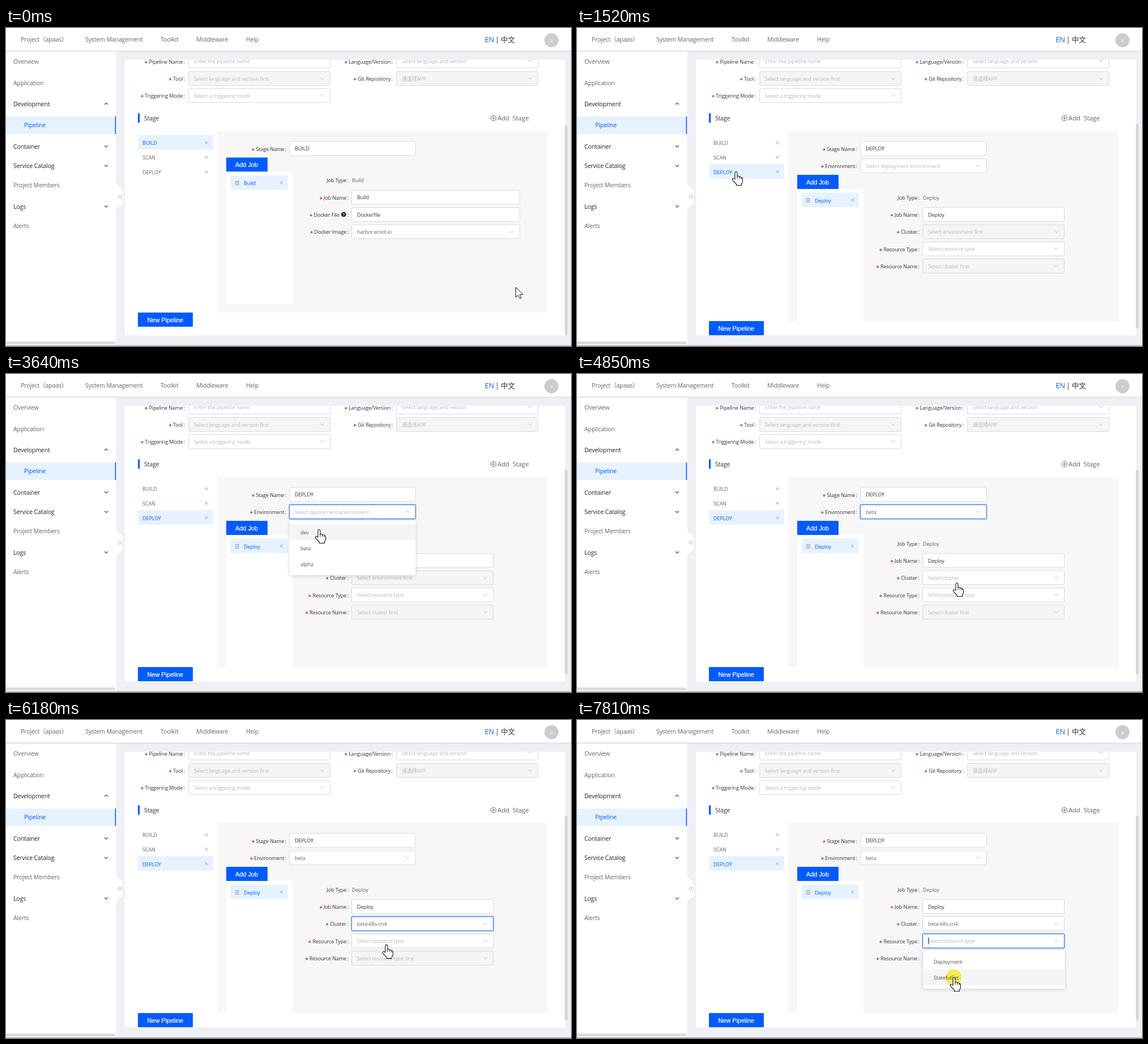
Animation of 998 by 561 pixels, one loop 7.99 s. Source, as an HTML page:

```html
<!DOCTYPE html>
<html lang="en">
<head>
<meta charset="utf-8">
<title>Pipeline editor</title>
<style>
html, body { margin: 0; width: 100%; height: 100%; overflow: hidden; background: #fff; }
svg { display: block; width: 100%; height: 100%; }
text {
  font-family: "Open Sans", "Noto Sans CJK SC", "Noto Sans CJK", sans-serif;
  letter-spacing: -.015em;
  white-space: pre;
}
.button { font-family: "Liberation Sans", Arial, sans-serif; letter-spacing: 0; stroke: #fff; stroke-width: .25px; }
.star { font-weight: bold; fill: #d8232a; }
.drop { filter: drop-shadow(0 1.5px 3px rgba(0, 0, 0, .17)); }
.click { mix-blend-mode: multiply; }
</style>
</head>
<body>
<svg id="stage" viewBox="0 0 998 561"></svg>
<script>
const LOOP = 7990;
const BLUE = '#005bff', PALE = '#e6f2ff', DARK = '#333', GREY = '#666', HINT = '#b8b8b8', LINE = '#d9d9d9';
const stage = document.getElementById('stage');

// Moments at which the interface reacts
const HOVER_TAB = 810, OPEN_STAGE = 1520;
const HOVER_ENV = 2990, OPEN_ENV = 3200, PICK_ENV = 4200;
const HOVER_CLUSTER = 4950, OPEN_CLUSTER = 5250, PICK_CLUSTER = 6100;
const HOVER_TYPE = 6500, CLICK_TYPE = 6790, OPEN_TYPE = 6860;

// Pointer: [first step, last step, number of steps, x, y]
const START = { x: 900, y: 457 };
const moves = [
  [270, 890, 9, 281, 253],
  [2160, 2920, 11, 543, 296],
  [2990, 3130, 3, 546, 249],
  [3430, 3640, 4, 553, 274],
  [3710, 3780, 2, 556, 290],
  [3880, 3940, 2, 557, 303],
  [4200, 4850, 10, 671, 368],
  [5250, 5480, 4, 673, 377],
  [5550, 5870, 5, 672, 397],
  [6100, 6640, 8, 672, 391],
  [6860, 7580, 10, 666, 451],
  [7660, 7660, 1, 666, 454]
];
const arrowTimes = [[0, HOVER_TAB], [2390, HOVER_ENV], [4270, 4700], [5320, 5620]];
const clicks = [[1380, 1520], [3130, 3200], [4100, 4200], [5090, 5250], [6020, 6100], [6640, 6790], [7810, LOOP]];

const within = (t, spans) => spans.some(([a, b]) => t >= a && t < b);
const between = (t, a, b) => t >= a && t < b;
const clamp = v => Math.max(0, Math.min(1, v));

const rect = (x, y, w, h, fill, more = '') =>
  `<rect x="${x}" y="${y}" width="${w}" height="${h}" fill="${fill}" ${more}/>`;
const path = (d, stroke, width = 1, fill = 'none', more = '') =>
  `<path d="${d}" fill="${fill}" stroke="${stroke}" stroke-width="${width}" ${more}/>`;
const circle = (x, y, r, fill, more = '') => `<circle cx="${x}" cy="${y}" r="${r}" fill="${fill}" ${more}/>`;
// y is the middle of the line
const text = (x, y, s, fill = GREY, size = 9.1, more = '') =>
  `<text x="${x}" y="${y + size * .37}" fill="${fill}" font-size="${size}" ${more}>${s}</text>`;

const chevron = (x, y, up, color = '#bbb', r = 3.6, width = 1) => {
  const d = up ? r / 2 : -r / 2;
  return path(`M${x - r} ${y + d}L${x} ${y - d}L${x + r} ${y + d}`, color, width);
};
const cross = (x, y) => path(`M${x - 2.5} ${y - 2.5}l5 5m0-5l-5 5`, '#888', .8);
const button = (x, y, w, s, tx) =>
  rect(x, y, w, 25, BLUE, 'rx="1"') + text(tx, y + 12.9, s, '#fff', 10.9, 'class="button"');

function label(x, y, name, star = true, gap = 1.5) {
  const mark = star ? '<tspan class="star" dy="2">*</tspan>' : '';
  const shift = star ? 'dx="2.5" dy="-2"' : '';
  return text(x, y, `${mark}<tspan ${shift}>${name}</tspan><tspan dx="${gap}">:</tspan>`, DARK, 9.1, 'text-anchor="end"');
}

function field(x, y, w, value, o = {}) {
  const box = stroke => rect(x + .7, y - 12.3, w, 24.7, o.off ? '#f5f5f5' : '#fff', `rx="1.5" stroke="${stroke}"`);
  let s = box(LINE);
  if (o.focus > 0) s += `<g opacity="${o.focus.toFixed(2)}">` +
    rect(x - .3, y - 13.3, w + 2, 26.7, 'none', 'rx="2.5" stroke="#005bff" stroke-opacity=".28" stroke-width="1.3"') +
    box('#2a70f5') + '</g>';
  else if (o.hover) s += box('#3a7bf7');
  s += text(x + 10, y + .5, value, o.color || HINT);
  if (o.select) s += chevron(x + w - 13.5, y, o.up);
  if (o.caret) s += rect(x + 10.3, y - 6, 1.1, 12, '#222');
  return s;
}

function dropdown(x, y, w, items, active) {
  return rect(x, y, w, items.length * 28 + 12, '#fff', 'rx="2" class="drop"') +
    items.map((item, i) => (i === active ? rect(x, y + 6 + i * 28, w, 28, '#f5f5f5') : '') +
      text(x + 19, y + 20.5 + i * 28, item, '#555')).join('');
}

function header() {
  const menu = [[26, 'Project（apaas）'], [140, 'System Management'], [273, 'Toolkit'], [336, 'Middleware'], [424, 'Help']];
  return rect(0, 0, 998, 40, '#fff') + rect(0, 40, 998, 1, '#dcdcdc') + rect(0, 41, 998, 1.5, '#e9eaee') +
    menu.map(([x, s]) => text(x, 20, s, GREY, 10.6)).join('') +
    text(845.5, 20.3, 'EN', '#1463ff', 13) + text(864.2, 20.3, '| 中文', DARK, 12.6) +
    circle(963.5, 21.5, 12.5, '#ccc') + text(963.5, 22, 'a', '#fff', 9, 'text-anchor="middle"');
}

function sidebar() {
  // [y, name, arrow]
  const items = [[59.5, 'Overview'], [97, 'Application'], [134, 'Development', 'up'], [209, 'Container', 'down'],
    [243.5, 'Service Catalog', 'down'], [277.5, 'Project Members'], [315, 'Logs', 'down'], [349.5, 'Alerts']];
  return rect(0, 42, 194.5, 519, '#fff') +
    path('M194 272Q195 279 201 282Q206.500 285 206.500 290V306Q206.500 311 201 314Q195 317 194 323Z', 'none', 0, '#fff') +
    path('M201 294l-3 3.500l3 3.500M205 294l-3 3.500l3 3.500', '#999', .9) +
    items.map(([y, s, arrow]) => text(13, y, s, arrow ? '#222' : GREY, 10.6) +
      (arrow ? chevron(177, y - .3, arrow === 'up', '#444', 3, 1.2) : '')).join('') +
    rect(0, 156, 194, 31, PALE) + rect(192.6, 156, 1.6, 31, BLUE) + text(32, 171.5, 'Pipeline', BLUE, 10.6) +
    rect(0, 553, 193, 5, '#dcdcdc', 'rx="2"') + rect(0, 559.5, 998, 1.5, '#bdbdbd');
}

function topForm() {
  const pick = { select: true }, locked = { select: true, off: true };
  return '<clipPath id="card"><rect x="210" y="56" width="778" height="486"/></clipPath><g clip-path="url(#card)">' +
    label(316, 59.5, 'Pipeline Name') + field(322, 58, 250, 'Enter the pipeline name') +
    label(683, 59.5, 'Language/Version') + field(689, 58, 250, 'Select language and version', pick) + '</g>' +
    label(316, 89.5, 'Tool') + field(322, 89, 250, 'Select language and version first', locked) +
    label(683, 89.5, 'Git Repository') + field(689, 89, 250, '请选择APP', locked) +
    label(316, 120, 'Triggering Mode') + field(322, 119, 250, 'Select a triggering mode', pick) +
    rect(233, 150.5, 3.2, 16.5, BLUE) + text(244, 159.5, 'Stage', DARK, 10.6) +
    circle(861, 159, 4.7, 'none', 'stroke="#666"') + path('M858.200 159h5.600m-2.800-2.800v5.600', GREY) +
    text(868, 159, 'Add  Stage', GREY, 11.6);
}

function stageTabs(t) {
  const deploy = t >= OPEN_STAGE;
  return ['BUILD', 'SCAN', 'DEPLOY'].map((name, i) => {
    const on = i === 0 ? !deploy : i === 2 && t >= HOVER_TAB;
    const y = 189 + i * 25.6;
    return (on ? rect(233, y, 133, 25.6, PALE) : '') +
      text(241, y + 14, name, on ? BLUE : GREY) + cross(354, y + 13.5);
  }).join('');
}

// Parts shared by both stages; the job area sits lower when there is an extra row
function stagePanel(stageName, job, drop, height) {
  return rect(373, 182, 583, height, '#f7f7f7') +
    label(495, 213.5, 'Stage Name') + field(500, 212.5, 222.5, stageName, { color: DARK }) +
    button(389, 228.5 + drop, 73, 'Add Job', 405) +
    rect(389, 253.5 + drop, 117, drop ? 233 : 233.5, '#fff') +
    rect(397, 260 + drop, 101, 25.5, PALE) +
    path(`M404.500 ${270.5 + drop}h7.500m-7.500 3h7.500m-7.500 3h7.500`, '#777', .9) +
    text(420, 273.8 + drop, job, BLUE) + cross(486.500, 273 + drop) +
    label(605, 268.8 + drop, 'Job Type', false) + text(611, 268.8 + drop, job) +
    label(605, 299.3 + drop, 'Job Name') +
    field(610, 298.5 + drop, drop ? 250 : 297, job, { color: DARK }) +
    button(233, 182 + height, 97, 'New Pipeline', 249.5);
}

function buildStage() {
  return stagePanel('BUILD', 'Build', 0, 320) +
    label(605, 329.5, 'Docker File', true, 14) + circle(596.5, 328.8, 4.4, '#222') +
    text(596.5, 329, '?', '#fff', 7, 'text-anchor="middle" font-weight="bold"') +
    field(610, 329, 297, 'Dockerfile', { color: DARK }) +
    label(605, 360, 'Docker Image') + field(610, 359.3, 297, 'harbor.eniot.io', { color: GREY, select: true });
}

function deployStage(t, pointer) {
  const fade = (from, to) => t < from ? 0 : (1 - clamp((t - to) / 350)) ** 2;
  const caret = (from, to) => between(t, from, to) && Math.floor((t - from) / 510) % 2 === 0;
  const envOpen = between(t, OPEN_ENV, PICK_ENV);
  const clusterOpen = between(t, OPEN_CLUSTER, PICK_CLUSTER);
  const typeOpen = t >= OPEN_TYPE;
  const envSet = t >= PICK_ENV, clusterSet = t >= PICK_CLUSTER;

  let s = stagePanel('DEPLOY', 'Deploy', 30.5, 335) +
    label(495, 244, 'Environment') +
    field(500, 243, 222.5, envSet ? 'beta' : 'Select deployment environment', {
      select: true, color: envSet ? GREY : HINT, up: envOpen,
      hover: between(t, HOVER_ENV, OPEN_ENV), focus: fade(OPEN_ENV, OPEN_CLUSTER), caret: caret(3130, 3640)
    }) +
    label(605, 360, 'Cluster') +
    field(610, 359.3, 250, clusterSet ? 'beta-k8s-cn4' : envSet ? 'Select cluster' : 'Select environment first', {
      select: true, color: clusterSet ? GREY : HINT, off: !envSet, up: clusterOpen,
      hover: between(t, HOVER_CLUSTER, OPEN_CLUSTER), focus: fade(OPEN_CLUSTER, CLICK_TYPE), caret: caret(OPEN_CLUSTER, PICK_CLUSTER)
    }) +
    label(605, 390.5, 'Resource Type') +
    field(610, 389.6, 250, 'Select resource type', {
      select: true, up: typeOpen, hover: t >= HOVER_TYPE, focus: fade(OPEN_TYPE, LOOP), caret: caret(CLICK_TYPE, LOOP)
    }) +
    label(605, 421, 'Resource Name') +
    field(610, 420, 250, clusterSet ? 'Select resource type first' : 'Select cluster first', { select: true, off: true });

  if (envOpen) s += dropdown(501, 259, 222.5, ['dev', 'beta', 'alpha'], pointer.y >= 288 ? 1 : 0);
  if (clusterOpen) s += dropdown(611, 375, 250.5, ['beta-k8s-cn4'], 0);
  if (typeOpen) s += dropdown(611, 406, 250.5, ['Deployment', 'StatefulSet'], pointer.y >= 440 ? 1 : 0);
  return s;
}

function pointerAt(t) {
  let { x, y } = START;
  for (const [from, to, steps, toX, toY] of moves) {
    if (t < from) break;
    const done = to > from ? Math.floor((t - from) / (to - from) * (steps - 1) + .001) + 1 : steps;
    const p = clamp(done / steps);
    const ease = p * p * (3 - 2 * p);
    x += (toX - x) * ease;
    y += (toY - y) * ease;
  }
  return { x, y };
}

function cursor(t, { x, y }) {
  const arrow = 'M.5 .5V18L4.600 14.300 7.500 20.500 10.200 19.300 7.400 13.200H13.300Z';
  const hand = 'M-2 14V2.300Q-2 .5 0 .5T2 2.300V8.500Q5 7.500 5.600 9.700Q8.500 8.800 9 11Q11.500 10.500 11.500 13V17.500' +
    'Q11.500 20 9.500 22V24.500H.5V22.500L-6 15.800Q-7.500 13.500-5.300 12.500Q-4 12.200-2 14Z';
  const shape = within(t, arrowTimes)
    ? path(arrow, '#111', 1, '#fff')
    : path(hand, '#111', 1.1, '#fff', 'stroke-linejoin="round"') + path('M2 8.500V13M5.600 9.700V13M9 11V14', '#111', .9);
  return (within(t, clicks) ? circle(x - .7, y, 14, '#fff45c', 'class="click"') : '') +
    `<g transform="translate(${x.toFixed(1)} ${y.toFixed(1)})">${shape}</g>`;
}

const base = rect(0, 0, 998, 561, '#eff0f5') + header() + sidebar() + rect(210, 56, 777.5, 486.5, '#fff') + topForm();

function scene(t) {
  const deploy = t >= OPEN_STAGE;
  const pointer = pointerAt(t);
  return base + rect(987, deploy ? 169 : 172, 5, deploy ? 361 : 370, '#d6d6d8', 'rx="2.5"') +
    stageTabs(t) + (deploy ? deployStage(t, pointer) : buildStage()) + cursor(t, pointer);
}

let shown = '';
const begin = performance.now();
function draw() {
  const next = scene((performance.now() - begin) % LOOP);
  if (next !== shown) stage.innerHTML = shown = next;
  requestAnimationFrame(draw);
}
draw();
</script>
</body>
</html>
```
